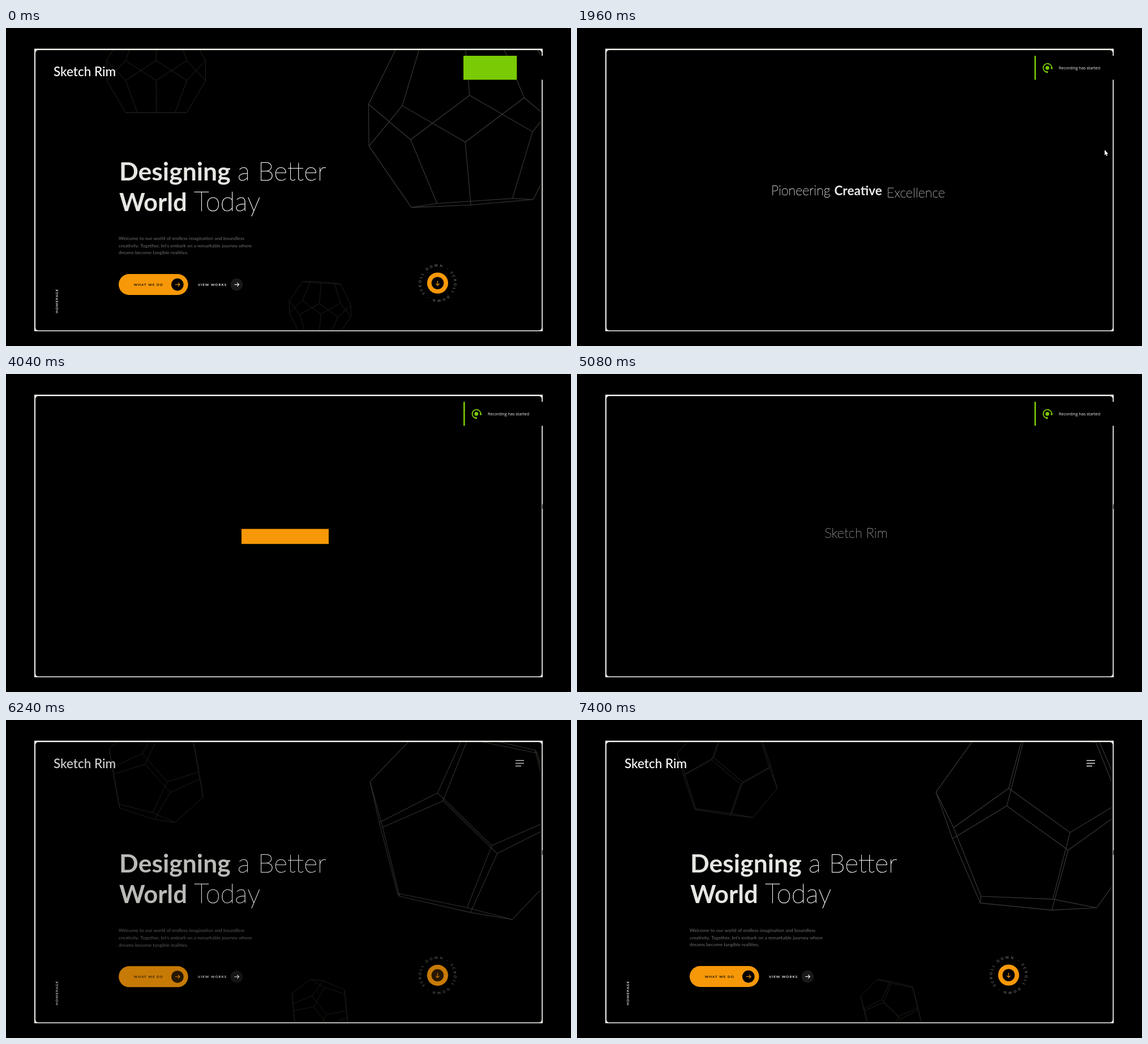
These frames come from a looping animation (998x561 px, 7.44 s). An HTML page with a canvas:

```html
<!DOCTYPE html>
<html lang="en">
<head>
<meta charset="utf-8">
<title>Studio homepage intro</title>
<style>
  html, body { margin: 0; width: 100%; height: 100%; overflow: hidden; background: #000; }
  canvas { display: block; }
</style>
</head>
<body>
<canvas id="stage" width="998" height="561"></canvas>
<script>
const ctx = document.getElementById('stage').getContext('2d');
const LOOP = 7440, RELOAD = 300, INTRO = 400;
const ORANGE = '#f79808', GREEN = '#7acb05', BRAND = 'Sketch Rim';
const PX = 0.522; // page pixels to stage pixels

const clamp = v => Math.min(1, Math.max(0, v));
const progress = (t, start, length) => clamp((t - start) / length);
const easeOut = p => 1 - (1 - p) ** 2;
const sineOut = p => Math.sin(p * Math.PI / 2);
const mix = (a, b, p) => a + (b - a) * p;

function rect(x, y, w, h, color) {
  ctx.fillStyle = color;
  ctx.fillRect(x, y, w, h);
}

function pill(x, y, w, h, r, color) {
  ctx.fillStyle = color;
  ctx.beginPath();
  ctx.roundRect(x, y, w, h, r);
  ctx.fill();
}

const disc = (x, y, r, color) => pill(x - r, y - r, 2 * r, 2 * r, r, color);

function line(points, color, width) {
  ctx.strokeStyle = color;
  ctx.lineWidth = width;
  ctx.beginPath();
  points.forEach(([x, y]) => ctx.lineTo(x, y));
  ctx.stroke();
}

function text(str, x, y, size, weight, color, { spacing = 0, align = 'left', family = 'Lato' } = {}) {
  ctx.font = `${weight} ${size}px ${family}, sans-serif`;
  ctx.letterSpacing = spacing + 'px';
  ctx.textAlign = align;
  ctx.fillStyle = color;
  ctx.fillText(str, x, y);
}

// Hairline type, thickened slightly so that it stays legible.
function thinText(str, x, y, size, outline, options) {
  text(str, x, y, size, 100, '#fff', options);
  ctx.strokeStyle = '#fff';
  ctx.lineWidth = outline;
  ctx.lineJoin = 'round';
  ctx.strokeText(str, x, y);
}

// Runs draw with its own opacity, offset and rotation.
function layer({ alpha = 1, x = 0, y = 0, turn = 0 }, draw) {
  ctx.save();
  ctx.globalAlpha *= alpha;
  ctx.translate(x, y);
  ctx.rotate(turn);
  draw();
  ctx.restore();
}

function arrow(x, y, color, turn = 0) {
  layer({ x, y, turn }, () => {
    line([[-4, 0], [4, 0]], color, 1.1);
    line([[1, -3.2], [4.2, 0], [1, 3.2]], color, 1.1);
  });
}

// Dodecahedron: cube corners plus three golden rectangles.
const PHI = (1 + Math.sqrt(5)) / 2;
const vertices = [];
for (const a of [-1, 1]) for (const b of [-1, 1]) {
  const p = a / PHI, q = b * PHI;
  vertices.push([a, b, 1], [a, b, -1], [0, p, q], [p, q, 0], [q, 0, p]);
}
const edges = [];
vertices.forEach((v, i) => vertices.slice(0, i).forEach((w, j) => {
  if (Math.abs(Math.hypot(v[0] - w[0], v[1] - w[1], v[2] - w[2]) - 2 / PHI) < 0.01) edges.push([i, j]);
}));

// A pose is an orientation at a time (s) with an angular velocity (rad/s).
const before = {
  time: -0.6, drift: 0, omega: [-0.055, -0.058, -0.11],
  basis: [[0, 0.851, -0.526], [0, 0.526, 0.851], [1, 0, 0]]
};
const after = {
  time: 7.4, drift: -0.057, omega: [-0.109, 0.013, -0.126],
  basis: [[-0.584, 0.812, -0.077], [0.812, 0.584, -0.045], [-0.009, 0.089, 0.996]]
};
const solids = [
  { x: 815, y0: 160, y1: 175, unit: 108, lag: 0, color: '#3b3b38' },
  { x: 265.3, y0: 75, y1: 90, unit: 54, lag: 0.6, color: '#252523' },
  { x: 554.8, y0: 495.5, y1: 510.5, unit: 33.7, lag: 1.2, color: '#20201d' }
];

function rotate(v, omega, seconds) {
  const rate = Math.hypot(...omega), angle = rate * seconds;
  const [x, y, z] = omega.map(w => w / rate);
  const c = Math.cos(angle), s = Math.sin(angle);
  const k = (x * v[0] + y * v[1] + z * v[2]) * (1 - c);
  return [
    v[0] * c + (y * v[2] - z * v[1]) * s + x * k,
    v[1] * c + (z * v[0] - x * v[2]) * s + y * k
  ];
}

function drawSolid(solid, pose, seconds) {
  const age = seconds - pose.time;
  const basis = pose.basis.map(b => rotate(b, pose.omega, age - solid.lag));
  const cy = (pose === before ? solid.y0 : solid.y1) + pose.drift * solid.unit * age;
  const project = v => [0, 1].map(i =>
    (i ? cy : solid.x) + solid.unit * (v[0] * basis[0][i] + v[1] * basis[1][i] + v[2] * basis[2][i]));
  const points = vertices.map(project);
  for (const [a, b] of edges) line([points[a], points[b]], solid.color, solid.unit > 100 ? 1.1 : 0.9);
}

function scrollBadge(x, y) {
  disc(x, y, 18.6, ORANGE);
  disc(x, y, 10.8, '#000');
  arrow(x, y, ORANGE, Math.PI / 2);
  const label = 'SCROLL DOWN - ', radius = 29;
  ctx.font = '500 6px Lato, sans-serif';
  ctx.letterSpacing = '0px';
  const widths = [...label].map(c => ctx.measureText(c).width);
  const gap = (Math.PI * radius - widths.reduce((a, b) => a + b)) / label.length;
  let turn = 0.83;
  for (let half = 0; half < 2; half++) {
    [...label].forEach((c, i) => {
      const step = (widths[i] + gap) / radius;
      layer({ x, y, turn: turn + step / 2 }, () =>
        text(c, 0, -radius, 6, 500, '#858585', { align: 'center' }));
      turn += step;
    });
  }
}

function banner() {
  text('Designing', 200, 269, 44.5, 700, '#e6e6e2');
  thinText('a', 409, 269, 46, 0.5);
  thinText('Better', 445, 269, 46, 0.5);
  text('World', 200, 323, 43.5, 700, '#e6e6e2');
  thinText('Today', 332, 323, 47, 0.5);
  [
    'Welcome to our world of endless imagination and boundless',
    'creativity. Together, let\u2019s embark on a remarkable journey where',
    'dreams become tangible realities.'
  ].forEach((row, i) => text(row, 199, 374 + i * 12.7, 8.42, 400, '#707070'));

  pill(199, 434, 122.6, 37, 18.5, ORANGE);
  text('WHAT WE DO', 225.7, 454.8, 6.2, 700, '#141005', { spacing: 1.04 });
  disc(302.8, 452.6, 10.8, '#000');
  arrow(302.8, 452.6, ORANGE);
  text('VIEW WORKS', 339, 454.8, 6.2, 700, '#f0f0f0', { spacing: 1.04 });
  disc(407.3, 452.6, 10.8, '#191919');
  arrow(407.3, 452.6, '#fff');
  scrollBadge(762.4, 450);
}

function page(t, pose, rise) {
  ctx.save();
  ctx.beginPath();
  ctx.rect(54, 39, 890.5, 494.5);
  ctx.clip();
  solids.forEach(s => drawSolid(s, pose, t / 1000));
  ctx.restore();

  text(BRAND, 84, 84.6, 22.5, 500, '#fff');
  layer({ x: 92.3, y: 503, turn: -Math.PI / 2 }, () =>
    text('HOMEPAGE', 0, 0, 6.2, 700, '#eee', { spacing: 1.04 }));
  [15, 15, 10].forEach((w, i) => rect(900, 70.8 + i * 4.9, w, 1.3, '#fff'));

  ctx.save();
  ctx.globalAlpha *= rise;
  ctx.translate(499, 286 + 40 * PX * (1 - rise));
  ctx.scale(mix(0.98, 1, rise), mix(0.98, 1, rise));
  ctx.translate(-499, -286);
  banner();
  ctx.restore();
}

function intro(t) {
  const away = easeOut(progress(t, INTRO + 2100, 500));
  const words = [
    () => thinText('Pioneering', 343, 295, 23.3, 0.35),
    () => text('Creative', 454.5, 295, 22.5, 700, '#e8e8e8'),
    () => thinText('Excellence', 547, 295, 23.3, 0.35)
  ];
  words.forEach((drawWord, i) => {
    const p = easeOut(progress(t, INTRO + 500 + i * 400, 500));
    layer({ alpha: p * (1 - away), y: 30 * PX * (1 - p - away) }, drawWord);
  });

  const leave = easeOut(progress(t, 4950, 600));
  layer({ alpha: easeOut(progress(t, 3950, 500)) * (1 - leave), y: -30 * PX * leave }, () =>
    thinText(BRAND, 493, 295, 24, 0.35, { align: 'center' }));

  const show = easeOut(progress(t, 3000, 100));
  const grow = easeOut(progress(t, 3200, 450));
  const shrink = easeOut(progress(t, 4150, 300));
  const left = 416 - 30 * PX * show * (1 - grow), width = mix(2.6, 154, grow);
  layer({ alpha: show }, () =>
    rect(left + width * shrink, 273.3, width * (1 - shrink), 26.5, ORANGE));
}

function windowFrame(t) {
  ctx.fillStyle = '#f4f4ef';
  ctx.beginPath();
  ctx.rect(50, 36.6, 898, 498.4);
  ctx.roundRect(52, 39, 894.3, 494.6, 5);
  ctx.fill('evenodd');
  if (t > 2260) rect(947.3, 230, 0.7, 8, '#000');
}

function cursor(t) {
  if (t < 1580 || t > 2260) return;
  const inward = easeOut(progress(t, 1580, 380)), outward = progress(t, 1980, 280) ** 2;
  layer({ x: 948 - 16 * inward + 16 * outward, y: 206 + 9 * inward + 16 * outward }, () => {
    ctx.fillStyle = '#fff';
    ctx.beginPath();
    [[0, 0], [0, 9.4], [2, 7.5], [3.5, 10.8], [5, 10.1], [3.6, 7], [6.2, 6.8]]
      .forEach(([x, y]) => ctx.lineTo(x, y));
    ctx.fill();
  });
}

function toast(t) {
  const x = 808, y = 49, w = 140, h = 42.3;
  const exit = easeOut(progress(t, 5900, 300));
  if (exit === 1) return;
  if (t < 5860) rect(x, y, w, h, '#000');
  const open = progress(t, -63, 220), close = progress(t, 5560, 300);
  const green = close > 0 ? mix(2.6, w, easeOut(close)) : mix(w, 2.6, easeOut(open) * 0.6 + open ** 2 * 0.4);

  layer({ alpha: progress(t, 160, 240) }, () => {
    ctx.strokeStyle = GREEN;
    ctx.lineWidth = 1.9;
    ctx.beginPath();
    ctx.arc(831, 70.4, 7.5, Math.PI * 0.55, Math.PI * 2);
    ctx.stroke();
    disc(830.8, 70.4, 3.3, GREEN);
    disc(830.3, 77.7, 1.7, GREEN);
    ctx.fillStyle = GREEN;
    ctx.beginPath();
    [[836.2, 70], [841, 70], [838.5, 73.3]].forEach(p => ctx.lineTo(...p));
    ctx.fill();
    text('Recording has started', 851, 73.2, 7.2, 400, '#f2f2f2', { family: '"Open Sans"' });
  });
  rect(x + w * exit, y, green - w * exit, h, GREEN);
}

function draw(t) {
  rect(0, 0, 998, 561, '#000');
  if (t < RELOAD) {
    page(t, before, 1);
  } else {
    intro(t);
    const fade = sineOut(progress(t, 5750, 800));
    if (fade > 0) layer({ alpha: fade }, () => page(t, after, easeOut(progress(t, 5550, 800))));
  }
  windowFrame(t);
  toast(t);
  cursor(t);
}

const start = performance.now();
function tick() {
  draw((performance.now() - start) % LOOP);
  requestAnimationFrame(tick);
}
tick();
</script>
</body>
</html>
```
